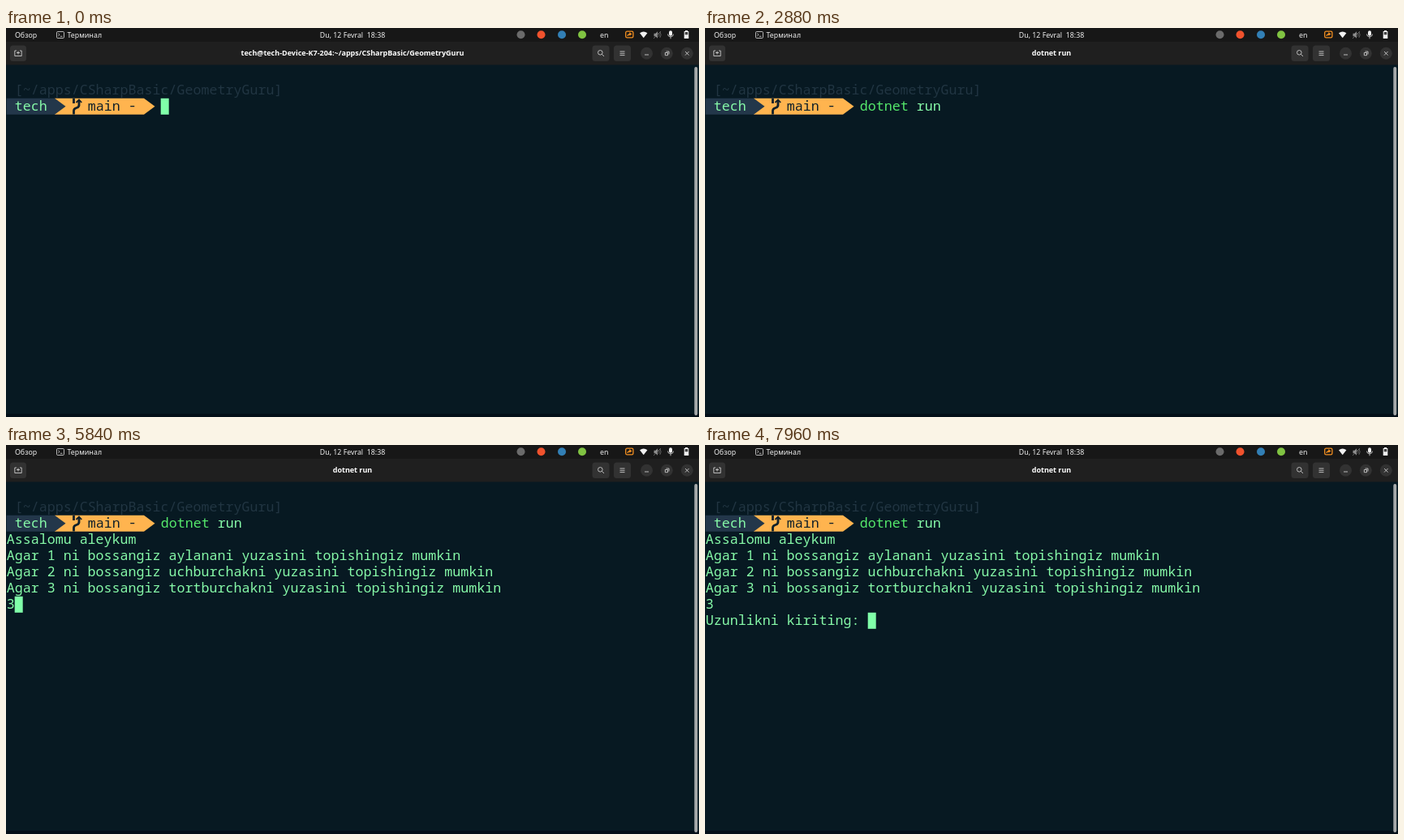
Write an HTML page that moves like this. It is 854x480 px and loops after 8000 ms.

```html
<!DOCTYPE html>
<html lang="uz">
<head>
<meta charset="utf-8">
<title>Terminal</title>
<style>
  html, body { margin: 0; width: 100%; height: 100%; overflow: hidden; background: #071922; }
  svg { display: block; width: 100vw; height: 100vh; }
  text { white-space: pre; }
  .ui { font: 8.8px "Noto Sans", sans-serif; fill: #f0f0f0; }
  .title { font: bold 9px "Noto Sans", sans-serif; fill: #fff; text-anchor: middle; }
  .term { font: 16.667px "Noto Sans Mono", monospace; fill: #86f9a8; }
  .line { fill: none; stroke: #ddd; stroke-width: .8; }
</style>
</head>
<body>
<svg viewBox="0 0 854 480">
  <rect width="854" height="480" fill="#071922"/>
  <rect y="476" width="854" height="4" fill="#030f18"/>
  <rect width="854" height="17" fill="#171717"/>
  <rect y="17" width="854" height="28.5" fill="#1f1f1f"/>
  <rect x="848.3" y="48" width="3.9" height="430" rx="1.9" fill="#a6a9aa"/>

  <!-- top bar -->
  <g class="ui">
    <text x="11" y="11.6">Обзор</text>
    <text x="75.5" y="11.6">Терминал</text>
    <text x="427" y="11.6" text-anchor="middle">Du, 12 Fevral  18:38</text>
    <text x="732" y="11.6">en</text>
  </g>
  <g class="line">
    <rect x="62.5" y="4.5" width="9" height="8" rx="1.2"/>
    <path d="M64.3 6.7l1.8 1.6-1.8 1.6M67 10.3h2.5"/>
  </g>
  <circle cx="634.5" cy="8.3" r="5" fill="#6b6b6b"/>
  <circle cx="659.5" cy="8.3" r="5" fill="#f0522d"/>
  <circle cx="685" cy="8.3" r="5" fill="#327fb5"/>
  <circle cx="710" cy="8.3" r="5" fill="#80c342"/>
  <g fill="none" stroke="#f39022" stroke-width="1.3">
    <rect x="763.7" y="4.2" width="9.2" height="7.6" rx="1.6"/>
    <path d="M766 9.8q.5-2.4 3.6-2.4M768.2 5.7l2.2 1.7-2.2 1.7"/>
  </g>
  <path d="M781 6.3q4.7-3.8 9.4 0l-4.7 6z" fill="#f2f2f2"/>
  <path d="M798.5 6.7h2l2.5-2.5v8.5l-2.5-2.5h-2z" fill="#8d8d8d"/>
  <path class="line" d="M804.3 6.2q1.5 2.2 0 4.4M806 5q2.2 3.4 0 6.8M798 13l9-9" style="stroke:#777"/>
  <rect x="817" y="3.2" width="4" height="6.5" rx="2" fill="#f2f2f2"/>
  <path class="line" d="M815.5 7.5q0 3.3 3.5 3.3t3.5-3.3M819 10.8v2.5"/>
  <path d="M837 3h3v1h1.3v9h-5.6V4H837z" fill="#f2f2f2"/>
  <rect x="836.7" y="5" width="3.6" height="3.3" fill="#444"/>

  <!-- window header -->
  <g fill="#323232">
    <rect x="5" y="21.5" width="20" height="19.5" rx="3.5"/>
    <rect x="722.5" y="21.5" width="21" height="19.5" rx="3.5"/>
    <rect x="749" y="21.5" width="21" height="19.5" rx="3.5"/>
    <circle cx="789.5" cy="31.3" r="7.5"/>
    <circle cx="814.3" cy="31.3" r="7.5"/>
    <circle cx="839.3" cy="31.3" r="7.5"/>
  </g>
  <g class="line">
    <path d="M13 28h-2.200v6.500h8.400V28H17M15 28.500v4M13 30.500h4"/>
    <circle cx="732.3" cy="30.3" r="2.8"/>
    <path d="M734.4 32.4l2.6 2.6"/>
    <path d="M756.500 29h6M756.500 31.300h6M756.500 33.600h6"/>
    <path d="M787 33h5"/>
    <path d="M812.3 30.5h3.2v3.2h-3.2zM813.5 29h3.5v3.5"/>
    <path d="M837 29l4.6 4.6M841.6 29l-4.6 4.6"/>
  </g>
  <text id="title" class="title" x="427" y="34.3"></text>

  <!-- shell prompt -->
  <path d="M60 86.800H170L183.500 96.800L170 106.800H60z" fill="#ffb44f"/>
  <path d="M.600 86.800H60L73.500 96.800L60 106.800H.600z" fill="#23374a"/>
  <g fill="none" stroke="#10202a">
    <path d="M83.500 87V93M83.500 106.500V102Q83.500 99.500 87 98.500T90 94V90" stroke-width="2.8"/>
    <path d="M86.500 92L90 88.500L93.200 92" stroke-width="1.8"/>
  </g>
  <g class="term">
    <text x="10.700" y="82.300" style="fill:#213542">[~/apps/CSharpBasic/GeometryGuru]</text>
    <text x="10.700" y="102.300">tech</text>
    <text x="100.700" y="102.300" style="fill:#10202a">main <tspan dy="-1">-</tspan></text>
    <text x="190.700" y="102.300"><tspan id="command" fill="#55e86b"></tspan><tspan id="argument"></tspan></text>
    <g id="output"></g>
  </g>
  <rect id="cursor" width="10" height="20" fill="#80ffa9"/>
</svg>
<script>
const LOOP = 8000, CELL = 10, ROW = 20, LEFT = 0.7, TOP = 46.8;
const TYPE_START = 40, TYPE_END = 320, COMMAND = "dotnet run";
const RUN = 1080, PRINT = 4840, CHOOSE = 5520, CONFIRM = 6520;
const BLINKS = [920, RUN, 1640, 2240, 2880, 3480, 4040, 4640, 5240, CHOOSE, 6120, CONFIRM, 7120, 7720];
const MENU = [["1", "aylanani"], ["2", "uchburchakni"], ["3", "tortburchakni"]]
  .map(([key, shape]) => `Agar ${key} ni bossangiz ${shape} yuzasini topishingiz mumkin`);

const get = id => document.getElementById(id);
const setText = (node, value) => { if (node.textContent !== value) node.textContent = value; };

const FIRST_ROW = 3;
const outputLines = Array.from({ length: 6 }, (_, i) => {
  const line = document.createElementNS("http://www.w3.org/2000/svg", "text");
  line.setAttribute("x", LEFT);
  line.setAttribute("y", TOP + (FIRST_ROW + i) * ROW + 15.5);
  return get("output").appendChild(line);
});

function outputAt(t) {
  if (t < PRINT) return [""];
  const lines = ["Assalomu aleykum", ...MENU, t < CHOOSE ? "" : "3"];
  if (t >= CONFIRM) lines.push("Uzunlikni kiriting: ");
  return lines;
}

function draw(t) {
  const progress = (t - TYPE_START) / (TYPE_END - TYPE_START);
  const typed = t < TYPE_START ? 0 : Math.min(COMMAND.length, 1 + Math.floor(progress * 9));
  setText(get("command"), COMMAND.slice(0, Math.min(typed, 6)));
  setText(get("argument"), COMMAND.slice(6, Math.max(typed, 6)));
  setText(get("title"), t < RUN ? "tech@tech-Device-K7-204:~/apps/CSharpBasic/GeometryGuru" : COMMAND);

  const lines = outputAt(t);
  outputLines.forEach((node, i) => setText(node, lines[i] || ""));

  const running = t >= RUN;
  const column = running ? lines.at(-1).length : 19 + typed;
  const row = running ? FIRST_ROW + lines.length - 1 : 2;
  const cursor = get("cursor");
  cursor.setAttribute("x", LEFT + column * CELL);
  cursor.setAttribute("y", TOP + row * ROW);
  cursor.style.display = BLINKS.filter(time => time <= t).length % 2 ? "none" : "";
}

const start = performance.now();
function tick() {
  draw((performance.now() - start) % LOOP);
  requestAnimationFrame(tick);
}
tick();
</script>
</body>
</html>
```
